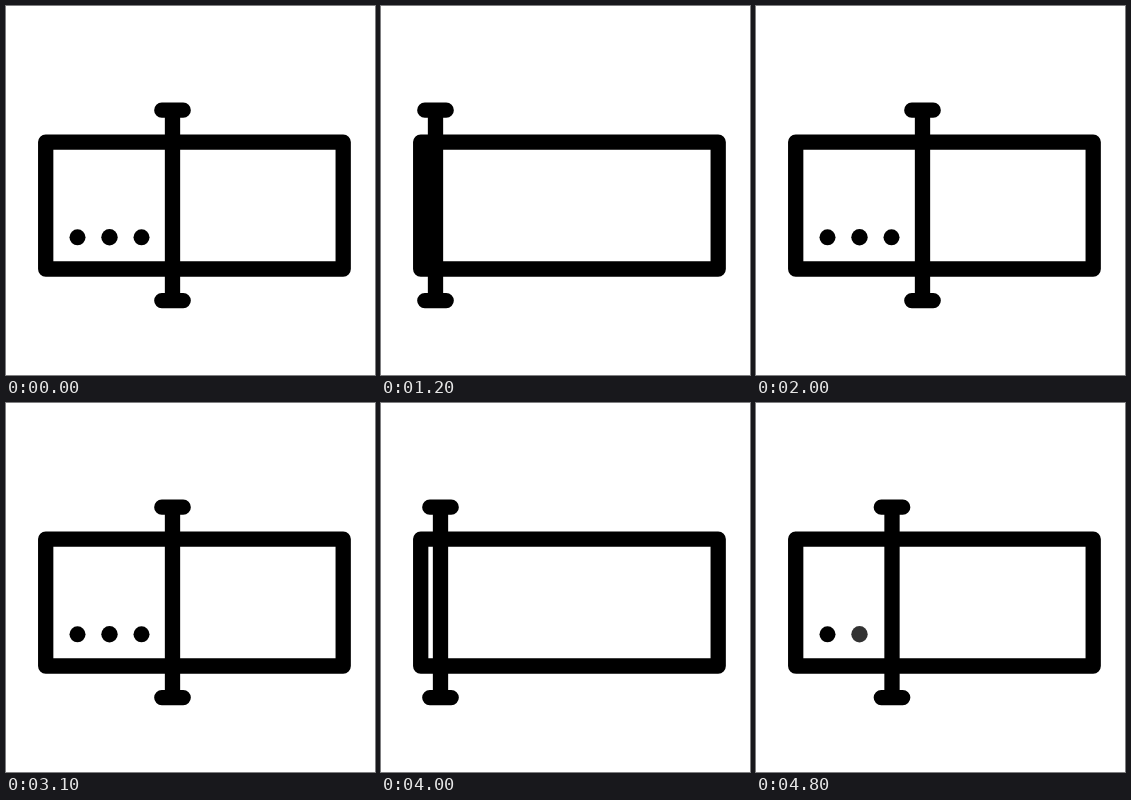
Recreate the animation shown at these times as an HTML page. Size 369x369 px, loop 4.9 s.

```html
<!DOCTYPE html>
<html lang="en">
<head>
<meta charset="utf-8">
<title>Text field cursor</title>
<style>
  html, body { margin: 0; width: 100%; height: 100%; overflow: hidden; background: #fff; }
  svg { display: block; width: 100vw; height: 100vh; }
  .line { fill: none; stroke: #000; stroke-width: 15.3; stroke-linecap: round; stroke-linejoin: round; }
</style>
</head>
<body>
<svg viewBox="0 0 369 369">
  <g id="dots">
    <circle cx="71.5" cy="231.3" r="8"/>
    <circle cx="103.5" cy="231.3" r="8.2"/>
    <circle cx="135.5" cy="231.3" r="8"/>
  </g>
  <rect class="line" x="39.7" y="136.1" width="297.5" height="126.9"/>
  <path id="cursor" class="line" d="M-10.7 104.2H10.7M0 104.2V294.6M-10.7 294.6H10.7"/>
</svg>
<script>
  const LOOP = 4900, STEP = 100;
  // time in ms, cursor x
  const path = [
    [0, 166.5], [270, 166.5], [600, 115.5], [700, 100.5], [1100, 39.5],
    [1200, 54.5], [1800, 146.5], [1930, 166.5], [3270, 166.5], [3600, 115.5],
    [4000, 59.5], [4100, 44.5], [4200, 54.5], [4800, 136], [LOOP, 136]
  ];
  // distance over which each dot fades in behind the cursor
  const fade = [18, 18, 12];
  const cursor = document.getElementById('cursor');
  const dots = [...document.querySelectorAll('#dots circle')];

  function cursorAt(t) {
    const i = path.findIndex(p => p[0] > t);
    const [t0, x0] = path[i - 1], [t1, x1] = path[i];
    return x0 + (x1 - x0) * (t - t0) / (t1 - t0);
  }

  function draw(now) {
    const t = Math.floor(now % LOOP / STEP) * STEP;
    const x = cursorAt(t);
    cursor.setAttribute('transform', `translate(${x} 0)`);
    dots.forEach((dot, i) => {
      const gap = x - dot.cx.baseVal.value - 18;
      dot.setAttribute('opacity', Math.max(0, Math.min(1, gap / fade[i])));
    });
  }

  let start;
  function tick(now) {
    start ??= now;
    draw(now - start);
    requestAnimationFrame(tick);
  }
  draw(0);
  requestAnimationFrame(tick);
</script>
</body>
</html>
```
